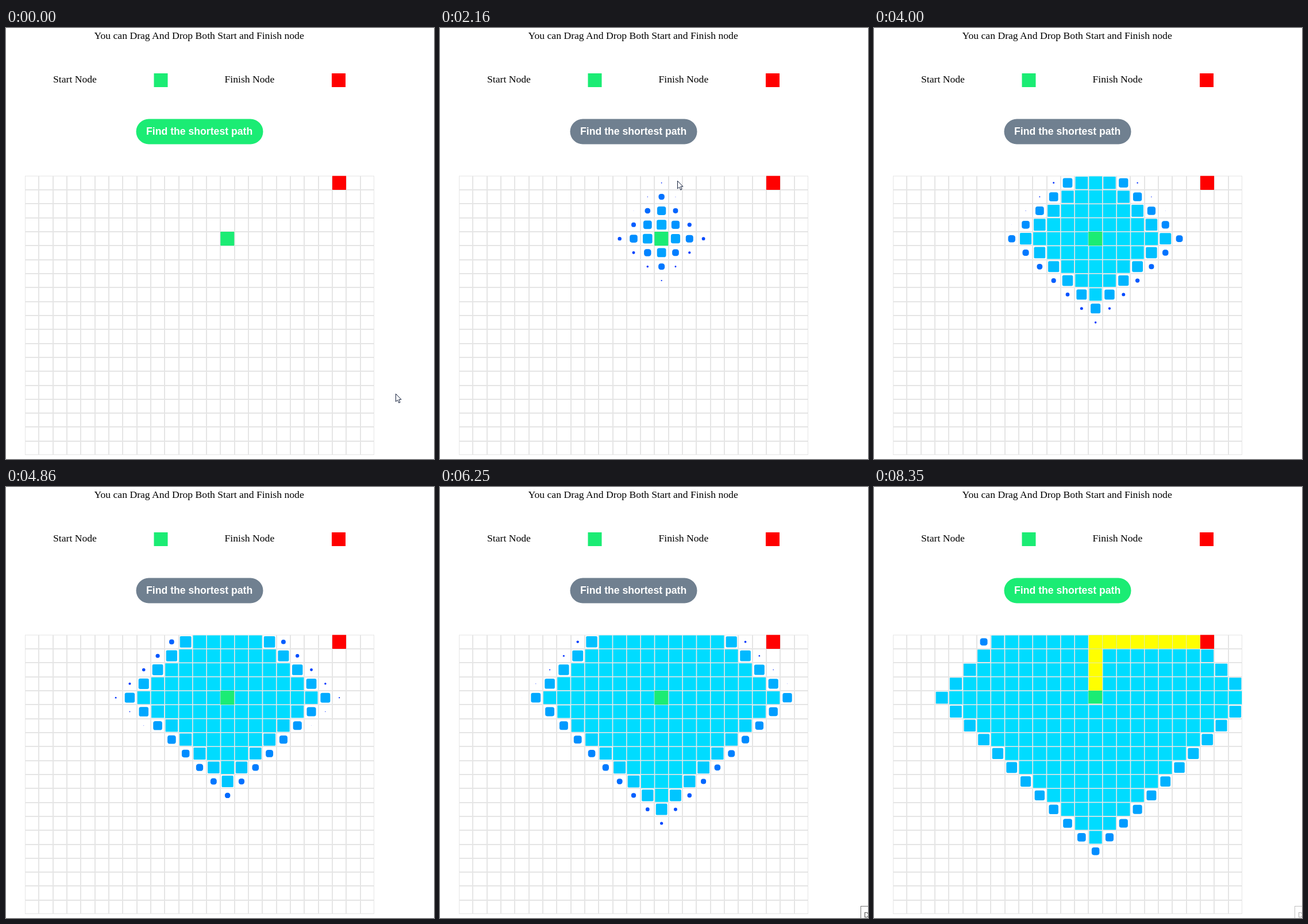
An HTML page that plays this animation: 745 px wide and 751 px high, repeating every 8.42 s.

```html
<!DOCTYPE html>
<html lang="en">
<head>
<meta charset="utf-8">
<title>Shortest path</title>
<style>
  html, body { margin: 0; width: 100%; height: 100%; overflow: hidden; background: #fff; }
  svg { display: block; }
  .serif { font: 17.65px "Liberation Serif", "Times New Roman", serif; }
  .bold { font: bold 17.65px "Liberation Sans", Arial, sans-serif; fill: #fff; }
  .tip { font: 12px "Liberation Sans", Arial, sans-serif; fill: #575757; }
</style>
</head>
<body>
<svg id="stage" width="745" height="751" viewBox="0 0 745 751">
  <text class="serif" x="153.5" y="19">You can Drag And Drop Both Start and Finish node</text>
  <text class="serif" x="82" y="95">Start Node</text>
  <text class="serif" x="380.5" y="95">Finish Node</text>
  <rect x="257.5" y="79" width="24" height="24" fill="#1bec74"/>
  <rect x="567" y="79" width="24" height="24" fill="#f00"/>
  <rect id="button" x="226.5" y="158.5" width="221" height="44" rx="22"/>
  <text class="bold" x="244" y="186">Find the shortest path</text>
  <path id="lines" fill="none" stroke="#e5e5e5" stroke-width="2"/>
  <rect x="33.5" y="258" width="607" height="485.5" fill="none" stroke="#e5e5e5"/>
  <g id="visited"></g>
  <g id="route" fill="#ff0"></g>
  <rect id="start" x="373.3" y="355" width="24" height="24.3" fill="#1bec74"/>
  <rect x="568" y="257.7" width="24" height="24.3" fill="#f00"/>
  <g id="tip">
    <rect x="732.5" y="730.5" width="40" height="40" fill="#fff" stroke="#767676"/>
    <text class="tip" x="738" y="750">D</text>
  </g>
  <g id="pointer" fill="#fff" stroke="#14203c" stroke-width="1" stroke-linejoin="round">
    <path id="arrow" d="M.5 .5V14L3.7 11.2 5.8 16.2 8 15.2 5.9 10.3H10Z"/>
    <path id="hand" d="M5 1.5Q6.5 0 8 1.5V8L16 10V16L14 22H7L1 13Q2 11 5 14Z"/>
  </g>
</svg>
<script>
const LOOP = 8420, COLS = 25, ROWS = 20, LEFT = 33, TOP = 257.7, SIZE = 24.32;
const START = { c: 14, r: 4 }, FINISH = { c: 22, r: 0 };
const GROW = 66, FULL = 22.7;

// Screen refreshes: first time, last time, count
const REFRESH = [
  [0, 0, 1], [70, 910, 12], [1060, 1060, 1], [1210, 1990, 11], [2080, 2850, 11],
  [2930, 3770, 12], [3850, 4690, 12], [4780, 5550, 11], [5630, 6420, 11],
  [6480, 7260, 11], [7340, 7650, 5], [7800, 8350, 8]
];
// Time, number of nodes visited so far
const SEARCH = [
  [1250, 0], [2160, 30], [3080, 60.2], [4860, 118.8],
  [6250, 167.6], [7490, 208.6], [8420, 238]
];
// Time, pointer x, pointer y
const POINTER = [
  [0, 678, 637], [910, 353, 179], [1060, 346, 165], [1500, 346, 165],
  [1990, 390, 206], [2160, 413, 266], [2850, 255, 436], [3200, 255, 436]
];

const $ = id => document.getElementById(id);
const mix = (a, b, p) => a + (b - a) * p;
const smooth = p => p * p * (3 - 2 * p);
const centre = ({ c, r }) => [LEFT + (c + .5) * SIZE, TOP + (r + .5) * SIZE];
const show = (el, on) => el.setAttribute("visibility", on ? "visible" : "hidden");

function set(el, values) {
  for (const key in values) el.setAttribute(key, values[key]);
}

function addRect(parent) {
  const el = document.createElementNS("http://www.w3.org/2000/svg", "rect");
  return $(parent).appendChild(el);
}

function square([x, y], size) {
  return { x: x - size / 2, y: y - size / 2, width: size, height: size };
}

function along(table, t, curve = p => p) {
  if (t <= table[0][0]) return table[0].slice(1);
  const i = table.findIndex(row => row[0] > t);
  if (i < 0) return table[table.length - 1].slice(1);
  const a = table[i - 1], b = table[i];
  const p = curve((t - a[0]) / (b[0] - a[0]));
  return a.slice(1).map((v, k) => mix(v, b[k + 1], p));
}

// The CSS "ease" curve
function ease(x) {
  if (x <= 0) return 0;
  if (x >= 1) return 1;
  const bez = (a, b, s) => 3 * a * s * (1 - s) ** 2 + 3 * b * s * s * (1 - s) + s ** 3;
  let lo = 0, hi = 1;
  for (let i = 0; i < 18; i++) {
    const mid = (lo + hi) / 2;
    if (bez(.25, .25, mid) < x) lo = mid; else hi = mid;
  }
  return bez(.1, 1, lo);
}

function screenTime(t) {
  let last = 0;
  for (const [from, to, count] of REFRESH) {
    if (t < from) break;
    const gap = (to - from) / (count - 1) || 1;
    last = from + Math.min(count - 1, Math.floor((t - from) / gap + 1e-6)) * gap;
  }
  return last;
}

let d = "";
for (let c = 1; c < COLS; c++) d += `M${Math.round(LEFT + c * SIZE)} 258V743.5`;
for (let r = 1; r < ROWS; r++) d += `M33 ${Math.round(TOP + r * SIZE)}H640.5`;
$("lines").setAttribute("d", d);

// Nodes by distance from the start, row by row within one distance
const distance = n => Math.abs(n.c - START.c) + Math.abs(n.r - START.r);
const nodes = Array.from({ length: COLS * ROWS },
  (_, i) => ({ c: i % COLS, r: Math.floor(i / COLS) }));
nodes.sort((a, b) => distance(a) - distance(b));
const end = nodes.findIndex(n => n.c === FINISH.c && n.r === FINISH.r);
const cells = nodes.slice(1, end).map((n, i) => ({ at: centre(n), order: i + 1, el: addRect("visited") }));

const route = [];
for (let r = START.r - 1; r > FINISH.r; r--) route.push({ c: START.c, r });
for (let c = START.c; c < FINISH.c; c++) route.push({ c, r: FINISH.r });
const steps = route.map(n => {
  const el = addRect("route");
  set(el, square(centre(n), 23.5));
  return el;
});

function draw(t) {
  const [head] = along(SEARCH, t);
  for (const { at, order, el } of cells) {
    const age = head > 0 ? head - order + 1 : 0;
    const p = ease(age / GROW);
    show(el, p > 0);
    if (p <= 0) continue;
    const size = FULL * p;
    set(el, {
      ...square(at, size),
      rx: size * Math.min(.5, .75 * (1 - p)),
      fill: `rgb(0,${Math.round(mix(25, 220, p))},255)`
    });
  }
  steps.forEach((el, i) => show(el, t >= 7780 + i * 45));
  $("start").setAttribute("height", t >= 7780 ? 22.5 : 24.3);

  const busy = t >= 1210 && t < 8300;
  $("button").setAttribute("fill", busy ? "#708090" : "#1bec74");

  const [x, y] = along(POINTER, t, smooth);
  const over = x > 226 && x < 448 && y > 158 && y < 202;
  $("pointer").setAttribute("transform", `translate(${x} ${y})`);
  show($("arrow"), !over && t < 3200);
  show($("hand"), over && t < 3200);

  show($("tip"), t >= 6150);
  $("tip").setAttribute("opacity", t >= 8340 ? .45 : 1);
}

const begin = performance.now();
let shown = -1;
function tick() {
  const t = screenTime((performance.now() - begin) % LOOP);
  if (t !== shown) draw(shown = t);
  requestAnimationFrame(tick);
}
tick();
</script>
</body>
</html>
```
